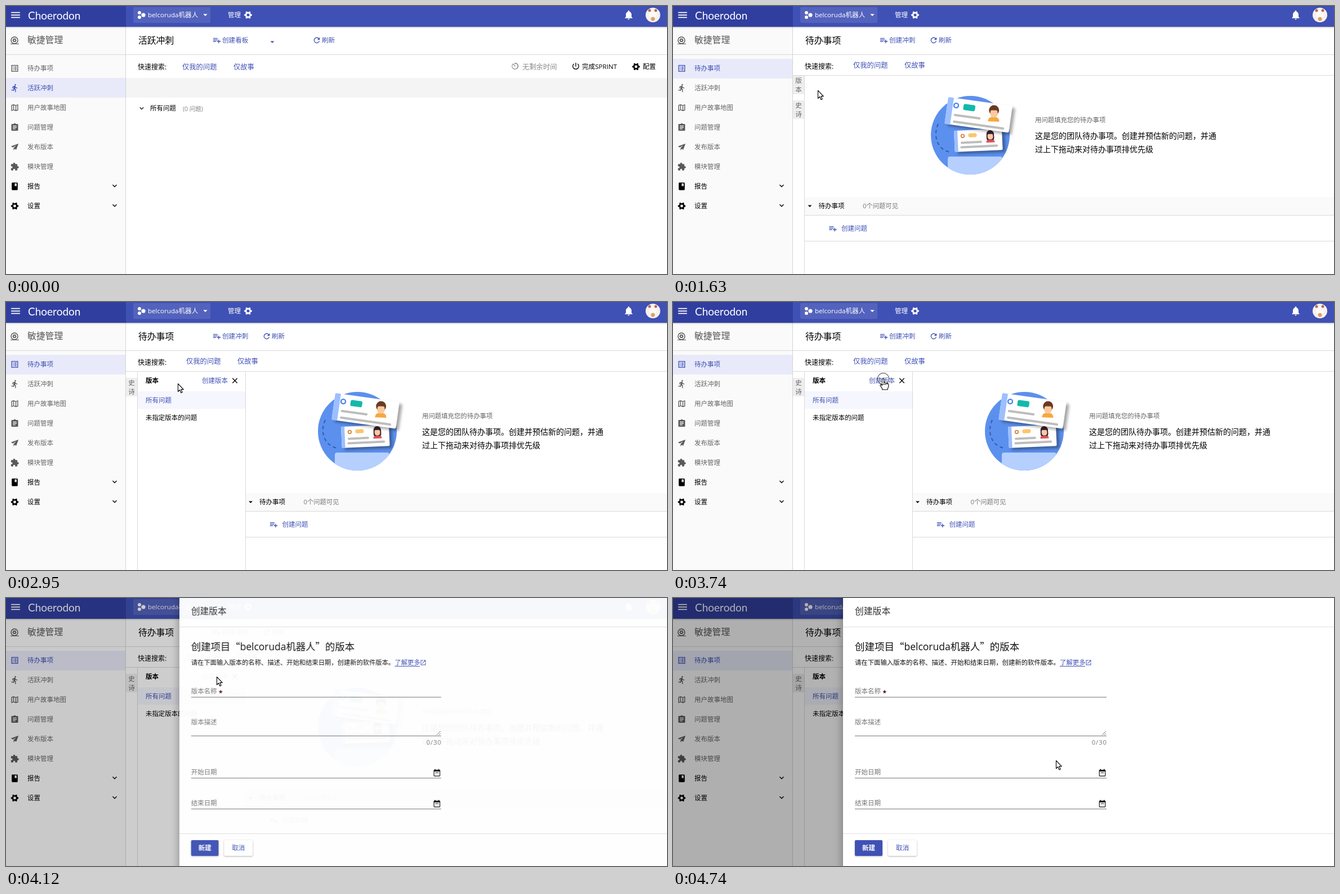
Recreate the animation shown at these times as an HTML page with a canvas. Size 1174 by 477 pixels, loop 4.81 s.

```html
<!DOCTYPE html>
<html lang="zh-CN">
<head>
<meta charset="utf-8">
<title>Choerodon</title>
<style>
html, body { margin: 0; width: 100%; height: 100%; overflow: hidden; background: #fff; }
canvas { display: block; }
</style>
</head>
<body>
<canvas id="stage" width="1174" height="477"></canvas>
<script>
const W = 1174, H = 477, LOOP = 4810;
const screen2d = document.getElementById('stage').getContext('2d');
const sheet = document.createElement('canvas');
sheet.width = W;
sheet.height = H;
const sheet2d = sheet.getContext('2d');
let c = screen2d;

const BLUE = '#3f51b5', GREY = '#666', RULE = '#d9d9d9';
const CJK = '"Noto Sans CJK SC", "Noto Sans CJK"';
const PROJECT = 'belcoruda';

const TICKS = [0, 90, 160, 240, 320, 400, 480, 860, 1010, 1090, 1170, 1250, 1330, 1410, 1500,
  1560, 1630, 1710, 1790, 1880, 2040, 2110, 2260, 2410, 2560, 2630, 2710, 2790, 2870, 2950,
  3040, 3110, 3190, 3260, 3410, 3560, 3740, 3960, 4050, 4120, 4210, 4280, 4360, 4430,
  4500, 4580, 4660, 4740];

// Pointer way points: time, x, y
const PATH = [[90, 70, 102], [480, 53, 112], [860, 52, 112], [1010, 52, 112], [1170, 68, 121],
  [1250, 88, 129], [1410, 190, 150], [1500, 248, 156], [1630, 257, 150], [1880, 228, 137],
  [2110, 226, 136], [2410, 226, 136], [2560, 232, 138], [2950, 305, 145], [3040, 326, 145],
  [3260, 370, 138], [3410, 373, 138], [3740, 373, 136], [3960, 374, 138], [4050, 374, 140],
  [4120, 374, 140], [4430, 383, 148], [4740, 680, 289]];

const ICONS = {
  menu: 'M3 18h18v-2H3zm0-5h18v-2H3zm0-7v2h18V6z',
  more: 'M16.6 8.6L12 13.2 7.4 8.6 6 10l6 6 6-6z',
  drop: 'M6.5 9.5l5.5 5.5 5.5-5.5z',
  bell: 'M12 22c1.1 0 2-.9 2-2h-4c0 1.1.9 2 2 2zm6-6v-5c0-3.1-1.6-5.6-4.5-6.3V4c0-.8-.7-1.5-1.5-1.5s-1.5.7-1.5 1.5v.7C7.6 5.4 6 7.9 6 11v5l-2 2v1h16v-1z',
  list: 'M3 3h18v18H3zM5 5v14h14V5zM11 7h6v2h-6zm0 4h6v2h-6zm0 4h6v2h-6zM7 7h2v2H7zm0 4h2v2H7zm0 4h2v2H7z',
  run: 'M13.5 5.5a2 2 0 1 0 0-4 2 2 0 0 0 0 4zm-3.6 13.9l1-4.4 2.1 2v6h2v-7.5l-2.1-2 .6-3c1.3 1.5 3.3 2.5 5.5 2.5v-2c-1.9 0-3.5-1-4.3-2.4l-1-1.6c-.4-.6-1-1-1.7-1-.3 0-.5.1-.8.1L6 8.3V13h2V9.6l1.8-.7L8.2 17l-4.9-1-.4 2z',
  map: 'M21 3l-6 2.1L9 3 3 5v16l6-2.1 6 2.1 6-2zM10 5.5l4 1.4v11.6l-4-1.4zM5 6.5l3-1v11.7l-3 1.1zm14 11l-3 1V6.9l3-1.2z',
  task: 'M5 3h4.2a3 3 0 0 1 5.6 0H19a2 2 0 0 1 2 2v14a2 2 0 0 1-2 2H5a2 2 0 0 1-2-2V5a2 2 0 0 1 2-2zM7 7v2h10V7zm0 4v2h10v-2zm0 4v2h7v-2z',
  plane: 'M22 3L2 10l5 3 9-6-7 8v6l3-4 4 2z',
  puzzle: 'M20.5 11H19V7a2 2 0 0 0-2-2h-4V3.5a2.5 2.5 0 0 0-5 0V5H4a2 2 0 0 0-2 2v3.8h1.5a2.7 2.7 0 0 1 0 5.4H2V20a2 2 0 0 0 2 2h3.8v-1.5a2.7 2.7 0 0 1 5.4 0V22H17a2 2 0 0 0 2-2v-4h1.5a2.5 2.5 0 0 0 0-5z',
  book: 'M6 2h12a2 2 0 0 1 2 2v16a2 2 0 0 1-2 2H6a2 2 0 0 1-2-2V4a2 2 0 0 1 2-2zM12 4v8l2.5-1.5L17 12V4z',
  add: 'M14 10H2v2h12zm0-4H2v2h12zm4 8v-4h-2v4h-4v2h4v4h2v-4h4v-2zM2 16h8v-2H2z',
  refresh: 'M17.7 6.3A8 8 0 1 0 19.7 14h-2.1A6 6 0 1 1 16.2 7.8L13 11h7V4z',
  power: 'M13 3h-2v10h2zm4.8 2.2l-1.4 1.4A7 7 0 1 1 7.6 6.6L6.2 5.2a9 9 0 1 0 11.6 0z',
  timer: 'M11 3v4h2V5.1A7 7 0 1 1 6.6 7.4L12 13.4l1.4-1.4-6.8-7A9 9 0 1 0 12 3z',
  close: 'M19 6.4L17.6 5 12 10.6 6.4 5 5 6.4l5.6 5.6L5 17.6 6.4 19l5.6-5.6 5.6 5.6 1.4-1.4-5.6-5.6z',
  date: 'M20 3h-1V1h-3v2H8V1H5v2H4a2 2 0 0 0-2 2v16a2 2 0 0 0 2 2h16a2 2 0 0 0 2-2V5a2 2 0 0 0-2-2zm0 18H4V8h16zM7 11h10v2H7z',
  open: 'M19 19H5V5h7V3H3v18h18v-9h-2zM14 3v2h3.6l-9.8 9.8 1.4 1.4L19 6.4V10h2V3z'
};
for (const k in ICONS) ICONS[k] = new Path2D(ICONS[k]);
const ARROW = new Path2D('M.5.5V14.5L3.7 11.5 6 16.7 8.2 15.7 6 10.6H10.3Z');
const HAND = new Path2D('M-1.6 1.4Q0-1 1.6 1.4V7.4Q3.4 6.4 4.4 8 6 7.2 7.2 8.8 9.4 8.4 9.8 10.4V14Q9.8 16 8.2 18V20H-1.4V18L-5 12.6Q-5.2 10.4-3.4 10.8L-1.6 12.6Z');

const clamp = v => Math.max(0, Math.min(1, v));

function box(x, y, w, h, fill, r = 0) {
  c.fillStyle = fill;
  c.beginPath();
  c.roundRect(x, y, w, h, r);
  c.fill();
}
const hline = (x, y, x2, color = RULE) => box(x, y, x2 - x, 1, color);
const vline = (x, y, y2, color = RULE) => box(x, y, 1, y2 - y, color);

function dot(x, y, r, fill) {
  c.fillStyle = fill;
  c.beginPath();
  c.arc(x, y, r, 0, 7);
  c.fill();
}

function ring(x, y, r, color, width) {
  c.strokeStyle = color;
  c.lineWidth = width;
  c.beginPath();
  c.arc(x, y, r, 0, 7);
  c.stroke();
}

// Draws text centred on y and returns the x where it ends
function text(s, x, y, size = 11.5, color = '#000', weight = 400, align = 'left') {
  const latin = /[“”]/.test(s) ? '' : '"Open Sans", ';
  c.font = `${weight} ${size}px ${latin}${CJK}, sans-serif`;
  c.fillStyle = color;
  c.textAlign = align;
  c.fillText(s, x, y + size * 0.38);
  return x + c.measureText(s).width;
}

function icon(name, x, y, color, size = 16) {
  const k = size / 24;
  c.save();
  c.translate(x - size / 2, y - size / 2);
  c.scale(k, k);
  c.fillStyle = color;
  c.fill(ICONS[name], 'evenodd');
  c.restore();
}

function gear(x, y, r, color) {
  c.fillStyle = color;
  c.beginPath();
  for (let i = 0; i < 24; i++) {
    const a = (i - 0.5) * Math.PI / 12, d = i % 4 < 2 ? r : r * 0.74;
    c.lineTo(x + d * Math.cos(a), y + d * Math.sin(a));
  }
  c.closePath();
  c.moveTo(x + r * 0.36, y);
  c.arc(x, y, r * 0.36, 0, 7);
  c.fill('evenodd');
}

function header() {
  box(0, 0, W, 37, BLUE);
  box(0, 0, 213, 37, '#303f9f');
  box(0, 37, W, 1, 'rgba(0,0,0,.2)');
  box(0, 38, W, 1, 'rgba(0,0,0,.1)');
  box(0, 39, W, 1, 'rgba(0,0,0,.04)');
  icon('menu', 17, 16, '#fff', 21);
  c.font = '400 19px Lato, sans-serif';
  c.textAlign = 'left';
  c.fillStyle = '#fff';
  c.fillText('Choerodon', 39, 23.5);
  box(226, 2, 137, 28, '#5363bd', 2);
  dot(237, 12, 3, '#fff');
  dot(237, 20, 3, '#fff');
  dot(244, 16, 3.6, '#fff');
  text(PROJECT + '机器人', 252, 16, 11.6, '#fff');
  icon('drop', 354, 16, '#fff');
  text('管理', 394, 16, 11.6, '#fff', 500);
  gear(430, 16, 7, '#fff');
  icon('bell', 1106, 16, '#fff', 20);
  dot(1149, 16, 13, '#f6f1ee');
  dot(1149, 15, 7, '#fffaf5');
  dot(1143, 8, 2.5, '#b56a5a');
  dot(1154, 8, 2.5, '#b56a5a');
  dot(1149, 23, 3.5, '#d9a06b');
}

function sidebar(t) {
  const backlog = t >= 1330, selected = backlog ? 0 : 1;
  box(0, 37, 212, H, '#fafafa');
  vline(212, 37, H, '#d4d4d4');
  ring(15, 61, 6, '#555', 1.4);
  gear(15, 61, 3.8, '#555');
  hline(8, 67, 23, '#555');
  text('敏捷管理', 38, 60, 15.8, '#555');
  hline(0, 86, 212);
  box(0, 94 + selected * 35 - (selected ? 1 : 0), 212, 35, '#e8eaf9');

  if (t >= 1010 && t < 1500) {
    c.save();
    c.beginPath();
    c.rect(0, 94, 212, 34);
    c.clip();
    const fade = 1 - clamp((t - 1250) / 250);
    dot(52, 112, 128 * Math.pow((t - 930) / 240, 0.8), `rgba(0,0,0,${0.12 * fade})`);
    c.restore();
  }

  const items = [['list', '待办事项'], ['run', '活跃冲刺'], ['map', '用户故事地图'], ['task', '问题管理'],
    ['plane', '发布版本'], ['puzzle', '模块管理'], ['book', '报告'], ['gear', '设置']];
  items.forEach(([name, label], i) => {
    const y = 111 + i * 35;
    const lit = i === selected || (i === 0 && t >= 90);
    const color = lit ? BLUE : i > 5 ? '#000' : '#595959';
    if (name === 'gear') gear(15.5, y, 6.8, color);
    else icon(name, 15.5, y, color);
    text(label, 38, y, 11.5, lit ? BLUE : i > 5 ? '#000' : GREY);
    if (i > 5) icon('more', 193, y - 1, '#000');
  });
}

function sprintPage() {
  text('活跃冲刺', 235, 61, 15.8);
  icon('add', 374.5, 61, BLUE);
  text('创建看板', 384, 61, 11.6, BLUE);
  icon('drop', 473, 64, BLUE, 15);
  icon('refresh', 552, 61, BLUE);
  text('刷新', 561, 61, 11.6, BLUE);
  hline(213, 86, W);
  text('快速搜索:', 234, 108, 12);
  text('仅我的问题', 313, 108, 12.3, BLUE);
  text('仅故事', 404, 108, 12.3, BLUE);
  icon('timer', 904, 107, '#8a8a8a');
  text('无剩余时间', 917, 108, 12.3, '#8a8a8a');
  icon('power', 1012, 107, '#000');
  text('完成SPRINT', 1023, 108, 11.6);
  gear(1119, 108, 6.8, '#000');
  text('配置', 1131, 108, 11.6);
  box(213, 128, W, 35, '#f4f4f4');
  icon('more', 241, 182, '#000', 15);
  text('所有问题', 256, 182, 11.5);
  text('(0 问题)', 314, 183, 10.5, '#888');
}

function face(x, y, hair, shirt, long) {
  box(x - 10, y + 9, 20, 8, shirt, [7, 7, 0, 0]);
  dot(x, y - 3, 9, hair);
  if (long) box(x - 9, y - 3, 18, 14, hair, 4);
  box(x - 6.5, y - 5, 13, 15, '#fbc9a0', 6);
  box(x - 7, y - 8, 14, 5, hair, 3);
}

function card(x, y, angle, w, h, strip, draw) {
  c.save();
  c.translate(x, y);
  c.rotate(angle);
  c.shadowColor = 'rgba(0,0,0,.35)';
  c.shadowOffsetX = 5;
  c.shadowOffsetY = 4;
  c.shadowBlur = 5;
  box(0, 0, w, h, '#fff', 2);
  c.shadowColor = 'transparent';
  box(0, 0, strip, h, '#9dbfff', [2, 0, 0, 2]);
  draw();
  c.restore();
}

// Round picture of two issue cards, centred on x, 230
function artwork(x) {
  c.save();
  c.translate(x, 230);
  dot(0, 0, 70, '#5c90ee');
  c.save();
  c.beginPath();
  c.arc(0, 0, 70, 0, 7);
  c.clip();
  box(-40, 38, 97, 50, '#b5cfff', 4);
  c.restore();
  c.setLineDash([6, 5]);
  c.strokeStyle = '#2f5dae';
  c.lineWidth = 2;
  c.beginPath();
  c.moveTo(-57, -20);
  c.bezierCurveTo(-67, 2, -58, 26, -36, 30);
  c.stroke();
  c.setLineDash([]);

  card(-29, -8, -0.045, 85, 38, 6, () => {
    ring(15, 10, 2.8, '#d9772b', 1.6);
    box(25, 6, 15, 7, '#fbc56d', 3);
    box(11, 20, 38, 4, '#bdbdbd', 2);
    box(10, 28, 67, 4, '#bdbdbd', 2);
    c.save();
    c.translate(64, 11);
    c.scale(0.75, 0.75);
    face(0, 0, '#3a2430', '#e0525c', true);
    c.restore();
  });
  card(-39, -68, 0.14, 115, 48, 10, () => {
    ring(16, 13, 4, '#4f86ec', 2.4);
    box(29, 8, 21, 11, '#13b8ac', 3);
    box(14, 28, 48, 4, '#bdbdbd', 2);
    box(14, 40, 92, 4, '#bdbdbd', 2);
    c.save();
    c.translate(84, 15);
    c.rotate(-0.1);
    face(0, 0, '#6b3a22', '#f6a83c', false);
    c.restore();
  });
  c.restore();
}

function sideTab(chars, y) {
  box(213, y, 20, 33, '#eeeeee');
  [...chars].forEach((s, i) => text(s, 223, y + 9 + i * 16, 11.5, GREY, 400, 'center'));
}

function backlogPage(open) {
  const dx = open ? 191.5 : 0, mid = open ? 96 : 0, left = open ? 425 : 234;
  text('待办事项', 235, 61, 15.8);
  icon('add', 374.5, 61, BLUE);
  text('创建冲刺', 384, 61, 11.6, BLUE);
  icon('refresh', 463, 61, BLUE);
  text('刷新', 472, 61, 11.6, BLUE);
  hline(213, 86, W);
  text('快速搜索:', 234, 107, 12);
  text('仅我的问题', 320, 105, 12.3, BLUE);
  text('仅故事', 411, 105, 12.3, BLUE);

  artwork(528 + mid);
  text('用问题填充您的待办事项', 643 + mid, 203, 11.4, GREY);
  text('这是您的团队待办事项。创建并预估新的问题，并通', 643 + mid, 231, 14);
  text('过上下拖动来对待办事项排优先级', 643 + mid, 255, 14);
  box(left, 340, W, 32, '#fafafa');
  hline(left, 372, W);
  icon('drop', 243 + dx, 356, '#000', 15);
  text('待办事项', 258.5 + dx, 356, 11.5);
  text('0个问题可见', 337 + dx, 356, 11.3, '#777');
  icon('add', 284 + dx, 396, BLUE);
  text('创建问题', 299 + dx, 396, 11.5, BLUE);
  hline(left, 418, W);

  hline(213, 123, W);
  vline(233, 124, H);
  if (!open) {
    sideTab('版本', 124);
    sideTab('史诗', 168);
    return;
  }
  sideTab('史诗', 135);
  vline(425, 124, H);
  text('版本', 248, 140, 11.5, '#000', 700);
  text('创建版本', 348, 140, 11.5, BLUE);
  icon('close', 406.5, 140, '#000');
  box(234, 159, 191, 31, '#f5f6fe');
  text('所有问题', 248, 175, 11.5, BLUE);
  text('未指定版本的问题', 248, 206, 11.45);
}

function drawer(counter) {
  c.clearRect(0, 0, W, H);
  c.shadowColor = 'rgba(0,0,0,.35)';
  c.shadowBlur = 16;
  box(302, -20, W, H + 40, '#fff');
  c.shadowColor = 'transparent';
  text('创建版本', 323, 23, 15.8, '#333');
  hline(302, 51, W, '#e0e0e0');
  let x = text('创建项目“', 323, 86, 17.5, '#111');
  x = text(PROJECT, x, 86, 17.5, '#111', 500);
  text('机器人”的版本', x, 86, 17.5, '#111');
  text('请在下面输入版本的名称、描述、开始和结束日期，创建新的软件版本。', 323, 115, 11.38, '#111');
  text('了解更多', 687, 115, 11.4, BLUE);
  hline(687, 121, 732, BLUE);
  icon('open', 738, 115, BLUE, 12);

  const fields = [['版本名称', 166, 176], ['版本描述', 221, 245], ['开始日期', 310, 320], ['结束日期', 365, 375]];
  fields.forEach(([label, y, base], i) => {
    text(label, 323, y, 11.5, '#757575');
    hline(323, base, 770, '#777');
    if (i > 1) icon('date', 762.5, y + 1, '#111', 14);
  });
  text('*', 372.5, 169, 12, '#420808', 700);
  c.strokeStyle = '#777';
  c.lineWidth = 1;
  c.beginPath();
  c.moveTo(762, 244);
  c.lineTo(769, 237);
  c.moveTo(766, 244);
  c.lineTo(769, 241);
  c.stroke();
  if (counter) {
    c.letterSpacing = '1px';
    text('0/30', 771, 257, 11.2, '#777', 400, 'right');
    c.letterSpacing = '0px';
  }

  hline(302, 419, W, '#e0e0e0');
  c.shadowColor = 'rgba(0,0,0,.3)';
  c.shadowBlur = 3;
  c.shadowOffsetY = 1;
  box(323, 431, 49, 28, BLUE, 2);
  box(382, 431, 51, 28, '#fff', 2);
  c.shadowColor = 'transparent';
  c.shadowOffsetY = 0;
  text('新建', 347.5, 445, 11.6, '#fff', 700, 'center');
  text('取消', 407.5, 445, 11.6, BLUE, 400, 'center');
}

function dialog(t) {
  box(0, 0, W, H, `rgba(0,0,0,${0.3 * clamp((t - 4026) / 145)})`);
  const p = 1 - Math.pow(1 - clamp((t - 4037) / 169), 5);
  if (!p) return;
  c = sheet2d;
  drawer(p > 0.5);
  c = screen2d;
  const s = 0.8 + 0.2 * p;
  c.save();
  c.globalAlpha = p;
  c.translate(W * (1 - s), 0);
  c.scale(s, 1);
  c.drawImage(sheet, 0, 0);
  c.restore();
}

function pointer(t) {
  if (t < PATH[0][0]) return;
  let i = 0;
  while (i < PATH.length - 2 && t >= PATH[i + 1][0]) i++;
  const [t0, x0, y0] = PATH[i], [t1, x1, y1] = PATH[i + 1];
  const k = clamp((t - t0) / (t1 - t0));
  const x = Math.round(x0 + (x1 - x0) * k), y = Math.round(y0 + (y1 - y0) * k);
  const hand = t < 4000 && (x < 233 || x > 348);
  c.save();
  c.translate(x, y);
  c.fillStyle = '#fff';
  c.strokeStyle = '#000';
  c.lineWidth = 1.1;
  c.lineJoin = 'round';
  const shape = hand ? HAND : ARROW;
  c.fill(shape);
  c.stroke(shape);
  if (hand) {
    c.beginPath();
    for (const px of [1.6, 4.4, 7.2]) {
      c.moveTo(px, 8);
      c.lineTo(px, 11);
    }
    c.stroke();
  }
  c.restore();
  const pressed = [[860, 1010], [2260, 2410], [3740, 3960]].some(([a, b]) => t >= a && t < b);
  if (pressed) {
    ring(x + 0.5, y + 0.5, 10, '#000', 1);
    ring(x + 0.5, y + 0.5, 9, '#fff', 1);
  }
}

function draw(t) {
  box(0, 0, W, H, '#fff');
  sidebar(t);
  if (t < 1330) sprintPage();
  else backlogPage(t >= 2410);
  header();
  if (t >= 3960) dialog(t);
  pointer(t);
}

const start = performance.now();
function loop() {
  const now = (performance.now() - start) % LOOP;
  draw(TICKS.findLast(v => v <= now));
  requestAnimationFrame(loop);
}
loop();
</script>
</body>
</html>
```
